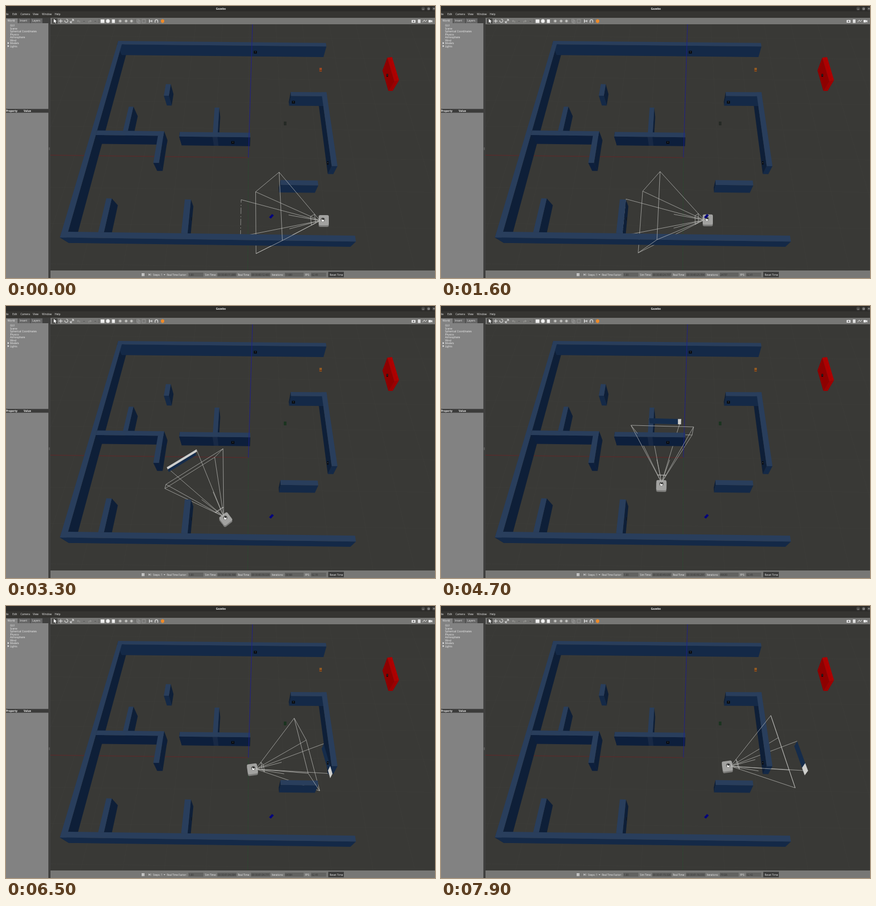
Write an HTML page with a canvas that moves like this. It is 800 px wide and 506 px high and loops after 8000 ms.

```html
<!DOCTYPE html>
<html lang="en">
<head>
<meta charset="utf-8">
<title>Gazebo</title>
<style>
html, body { margin: 0; width: 100%; height: 100%; overflow: hidden; background: #393936; }
canvas { display: block; }
</style>
</head>
<body>
<canvas id="stage" width="800" height="506"></canvas>
<script>
const g = document.getElementById("stage").getContext("2d");
const LOOP = 8000, STEP = 100, DEG = Math.PI / 180;
const TOP = "#293e5c", FRONT = "#142947", SIDE = "#0e1f38", DARK = "#0d1f3c";

const rect = (c, x, y, w, h) => { g.fillStyle = c; g.fillRect(x, y, w, h); };
const poly = (c, d) => { g.fillStyle = c; g.fill(new Path2D("M" + d + "Z")); };
const dot = (c, x, y, r) => { g.fillStyle = c; g.beginPath(); g.arc(x, y, r, 0, 7); g.fill(); };
const stroke = (c, d, w = 1) => { g.strokeStyle = c; g.lineWidth = w; g.stroke(new Path2D(d)); };
const text = (s, x, y, weight = 400, c = "#f0f0f0", size = 4.9) => {
  g.fillStyle = c;
  g.font = `${weight} ${size}px "Open Sans", "Noto Sans", sans-serif`;
  g.fillText(s, x, y);
};
const mix = (a, b, u) => a + (b - a) * u;
const mixAll = (a, b, u) => a.map((v, i) => mix(v, b[i], u));

// World: x right, y away from the viewer, z up; one unit is one pixel at the origin
const FOCAL = 621, PITCH = 59 * DEG, YAW = .014;
function project([x, y, z = 0]) {
  const away = y - x * YAW, c = Math.cos(PITCH), s = Math.sin(PITCH);
  const k = FOCAL / (FOCAL + away * c - z * s);
  return [441 + (x + y * YAW + 11) * k, 263 - (away * s + z * c - 19) * k];
}
const path = (...points) => points.map(p => project(p).join(" ")).join(" ");
const line = (...points) => "M" + path(...points);

// Wall footprints: x0, y0, x1, y1, front colour; far ones first
const HEIGHT = 31;
const walls = [
  [-290, -162, -280, 274],
  [-290, 263, 169, 274],
  [-168, 120, -158, 150],
  [144, -32, 154, 133],
  [83, 123, 154, 133],
  [-232, 36, -223, 92],
  [-66, 35, -57, 92],
  [-166, -30, -156, 36, DARK],
  [-280, 26, -156, 36, DARK],
  [-127, 25, 3, 35, DARK],
  [54, -69, 117, -60],
  [-233, -153, -224, -97],
  [-104, -153, -94, -97],
  [-290, -162, 165, -153]
];

function drawWalls() {
  for (const [x0, y0, x1, y1, front = FRONT] of walls) {
    const upright = (c, xa, ya, xb, yb) =>
      poly(c, path([xa, ya, 0], [xb, yb, 0], [xb, yb, HEIGHT], [xa, ya, HEIGHT]));
    const x = x1 < 0 ? x1 : x0;
    upright(SIDE, x, y0, x, y1);
    upright(front, x0, y0, x1, y0);
  }
  for (const [x0, y0, x1, y1] of walls)
    poly(TOP, path([x0, y0, HEIGHT], [x1, y0, HEIGHT], [x1, y1, HEIGHT], [x0, y1, HEIGHT]));
  poly("#ffffff0c", path([-66, 25, HEIGHT], [-57, 25, HEIGHT], [-57, 25], [-66, 25]));
}

function ground() {
  rect("#393936", 83, 34, 717, 458);
  let grid = "";
  for (let k = -10; k <= 10; k++)
    grid += line([k * 65, -260], [k * 65, 650]) + line([-650, k * 65], [650, k * 65]);
  stroke("#3f3f3c", grid, .6);
  stroke("#6c2022", line([0, 0], [-650, 0]), .8);
  g.setLineDash([2, 1]);
  stroke("#23512b", line([0, 0], [0, -250]), .8);
  g.setLineDash([]);
}

// Drive, turn, drive, turn, drive: time, x, y, heading (0 = left, 90 = away)
const track = [
  [0, 125, -122, 0],
  [3080, -37, -122, 0],
  [3460, -37, -122, 91],
  [5280, -39, -33, 91],
  [5600, -39, -33, 172],
  [7900, 79.5, -22, 172]
];

function robotAt(t) {
  let i = track.length - 2;
  while (t < track[i][0]) i--;
  const a = track[i], b = track[i + 1];
  const [, x, y, heading] = mixAll(a, b, (t - a[0]) / (b[0] - a[0]));
  const c = Math.cos(heading * DEG), s = Math.sin(heading * DEG);
  // Point given by distance ahead, to the right, and height
  const at = (ahead, right, z) => [x - c * ahead + s * right, y + s * ahead + c * right, z];
  return {
    x, y, heading, lens: at(6, 0, 8),
    far: [at(78, -53, 78), at(78, 53, 78), at(112, 53, 1), at(112, -53, 1)],
    image: [at(137, -31, 18), at(137, 31, 18)],
    facing: heading > 20,
    open: t < 3460 ? 0 : t < 5280 ? .9 : t < 6000 ? .1 : .75
  };
}

function lowRays({ lens, far: [, , br, bl], image, facing }) {
  let d = line(br, bl);
  for (const p of [br, bl, ...image]) d += line(lens, p);
  for (const p of image) {
    const [x, y] = mixAll(lens, p, .385);
    d += line(lens, [x, y, 0]);
  }
  stroke("#c4c4c0", d, .7);
  if (facing) return;
  g.setLineDash([12, 3, 2, 4]);
  stroke("#b4b4b0", line(...image), .7);
  g.setLineDash([]);
}

function highRays({ lens, far }) {
  const [tl, tr, br, bl] = far;
  stroke("#cbcbc7", line(lens, tl) + line(lens, tr) + line(bl, tl, tr, br) +
    line(...far.map(p => mixAll(lens, p, .14))) + "Z", .7);
}

// The camera view stands on the floor; its free part is white
function cameraView({ image: [a, b], facing, open }) {
  if (!facing) return;
  const at = (u, v) => { const [x, y, z] = mixAll(a, b, u); return [x, y, z * (1 - v)]; };
  const share = open < .5 ? .45 : 1;
  poly("#152c4b", path(at(0, 0), at(.95, 0), at(.95, 1), at(0, 1)));
  poly("#cfcfcc", path(at(open, 0), at(1, 0), at(1, share), at(open, share)));
}

function body({ x, y, heading, lens }) {
  const [px, py] = project([x, y, 8]), [lx, ly] = project(lens);
  const box = (c, dy) => {
    g.save();
    g.translate(px, py + dy);
    g.rotate(heading * DEG);
    g.fillStyle = c;
    g.beginPath();
    g.roundRect(-9.5, -9.5, 19, 19, 3);
    g.fill();
    g.restore();
  };
  rect("#252525", px - 7, py + 8, 4, 3);
  box("#7b7b79", 2);
  box("#a2a2a0", -1);
  const cx = mix(px, lx, .25), cy = mix(py, ly, .25) - 1;
  dot("#50504e", cx, cy - 1, 3.8);
  dot("#f2f2f0", cx, cy, 2.5);
  dot("#222", cx + .5, cy - 2, 1.5);
}

function props(t) {
  poly("#8e0000", "711 96 724 140 713 158 702 120");
  poly("#9c0000", "724 140 733 138 721 158 713 158");
  poly("#ad0000", "711 96 720 95 733 138 724 140");
  for (const [x, y, w, h] of [[465, 86, 6, 5], [536, 179, 6, 5], [423, 254, 6, 5],
    [600, 292, 3, 6], [711, 129, 3, 5]]) {
    rect("#0a0c0f", x - w / 2, y - h / 2, w, h);
    rect("#59636e", x - .7, y - 1, 1.4, 1);
  }
  rect("#101a28", 345, 393, 2, 6);
  rect(t < 1000 ? "#a04922" : "#955c22", 584.5, 115, 4.5, 7);
  rect("#6a3719", 584.5, 119, 4.5, 2);
  rect(t < 2000 ? "#252925" : "#1b3320", 518, 215, 5, 7);
}

function chrome() {
  rect("#2c2b29", 0, 0, 800, 10);
  text("Gazebo", 391.5, 6.8, 700, "#eee", 5);
  for (const x of [778, 788, 798]) dot("#484745", x, 5, 3.5);
  stroke("#ddd", "M776.5 6h3M787 4h2.5v2.5h-2.5zM797 4l2 2m0-2l-2 2", .6);
  rect("#353431", 0, 10, 800, 12);
  [["File", -3], ["Edit", 12], ["Camera", 27], ["View", 50], ["Window", 67], ["Help", 91]]
    .forEach(([s, x]) => text(s, x, 16.8));

  // side panel
  rect("#3f3f3e", 0, 22, 83, 484);
  rect("#828282", 0, 32, 79, 474);
  ["World", "Insert", "Layers"].forEach((s, i) => {
    rect(i ? "#666" : "#828282", i * 23, 23, 22, 9);
    text(s, 3 + i * 23, 29);
  });
  ["GUI", "Scene", "Spherical Coordinates", "Physics", "Atmosphere", "Wind", "Models", "Lights"]
    .forEach((s, i) => text(s, 7.5, 38 + i * 5.5));
  for (const y of [69, 74.5]) poly("#eee", `3 ${y - 2} 6 ${y} 3 ${y + 2}`);
  rect("#3b3b3a", 0, 191.5, 79, 7);
  text("Property", 0, 196.8, 700);
  text("Value", 33, 196.8, 700);
  rect("#777", 80.3, 263, 1, 5);

  // toolbar
  rect("#777775", 83, 22, 717, 12);
  rect("#484846", 86, 23, 10, 10);
  poly("#fff", "89 24 94.5 28.5 92 29 93.5 32 92 32 91 29.5 89 31");
  stroke("#eee", "M98.5 28h7M102 24.5v7M109.5 27a3 3 0 1 0 3-2.5M120 31l6-6M120 28v3h3M123 25h3v3", 1);
  stroke("#9c9c9a", "M133 28h4a2 2 0 0 1 0 3M133 28l2-2m-2 2l2 2M159 28h-4a2 2 0 0 0 0 3M159 28l-2-2m2 2l-2 2", .9);
  rect("#555", 144, 28, 3, 1);
  rect("#555", 165, 28, 3, 1);
  rect("#eee", 176.5, 25, 7, 6.5);
  dot("#eee", 190, 28, 3.5);
  rect("#eee", 197.5, 25, 5.5, 6.5);
  for (const x of [213, 224, 234])
    stroke("#e8e8e6", `M${x - 3} 28h6M${x} 25v6M${x - 2} 26l4 4m0-4l-4 4`, .7);
  stroke("#9e9e9c", "M244 25h4v5h-4zM246 27h4v5h-4zM254 25h6v6h-6z", .8);
  stroke("#eee", "M267.5 25v6M267.5 28h5M272 26v4M278 31v-3a2.5 2.5 0 0 1 5 0v3", 1.1);
  poly("#ee8a28", "289 26 292 24.5 295 26 295 30 292 32 289 30");
  stroke("#5b5b59", "M173 24v8M207 24v8M241 24v8M263.5 24v8M286 24v8", .6);
  rect("#eee", 756.5, 26, 7, 5);
  dot("#777", 760, 28.5, 1.5);
  rect("#ddd", 768, 25, 5, 6.5);
  stroke("#eee", "M777 30l3-4 2 3 3-3", .9);
  rect("#eee", 788, 26, 4.5, 4.5);
  poly("#eee", "792 28 795 26 795 31");
}

const pad = (n, w = 2) => String(n).padStart(w, "0");
const clock = ms => `00 00:${pad(Math.floor(ms / 60000))}:` +
  `${pad(Math.floor(ms / 1000) % 60)}.${pad(ms % 1000, 3)}`;

function status(t) {
  const steps = Math.round(11889 + 8.03 * t);
  rect("#777775", 83, 492, 717, 14);
  rect("#fff", 253.5, 497, 1.5, 5.5);
  rect("#fff", 256.2, 497, 1.5, 5.5);
  poly("#ccc", "266 497.5 269 499.7 266 502");
  rect("#ccc", 269.5, 497.5, .8, 4.5);
  text("Steps: 1", 274, 501.5);
  poly("#ddd", "294 499 297 499 295.5 501");
  const field = (label, x, value, left, w) => {
    text(label, x, 501.5, 400, "#f0f0f0", 4.6);
    rect("#626260", left, 496, w, 7.5);
    text(value, left + 1, 501.5, 400, "#303030", 4.5);
  };
  field("Real Time Factor:", 300, "1.00", 340, 28);
  field("Sim Time:", 371, clock(steps), 394, 36);
  field("Real Time:", 432.5, clock(steps + 594 + Math.round(t / 70)), 457, 36);
  field("Iterations:", 495.5, steps, 520, 35);
  field("FPS:", 557.5, (62.49 - (t / STEP * 7 % 13) / 100).toFixed(2), 569, 28);
  rect("#3b3b3a", 601, 494.5, 29, 10);
  text("Reset Time", 603.5, 501.5);
}

function draw(now) {
  const t = Math.floor(now % LOOP / STEP) * STEP, robot = robotAt(t);
  ground();
  lowRays(robot);
  drawWalls();
  stroke("#1c1c96", line([0, 0, 0], [0, 0, 330]), .9);
  cameraView(robot);
  props(t);
  body(robot);
  poly("#05057e", "490.5 393 496 387 499.5 389.5 494 395.5");
  highRays(robot);
  chrome();
  status(t);
  requestAnimationFrame(draw);
}
requestAnimationFrame(draw);
</script>
</body>
</html>
```
